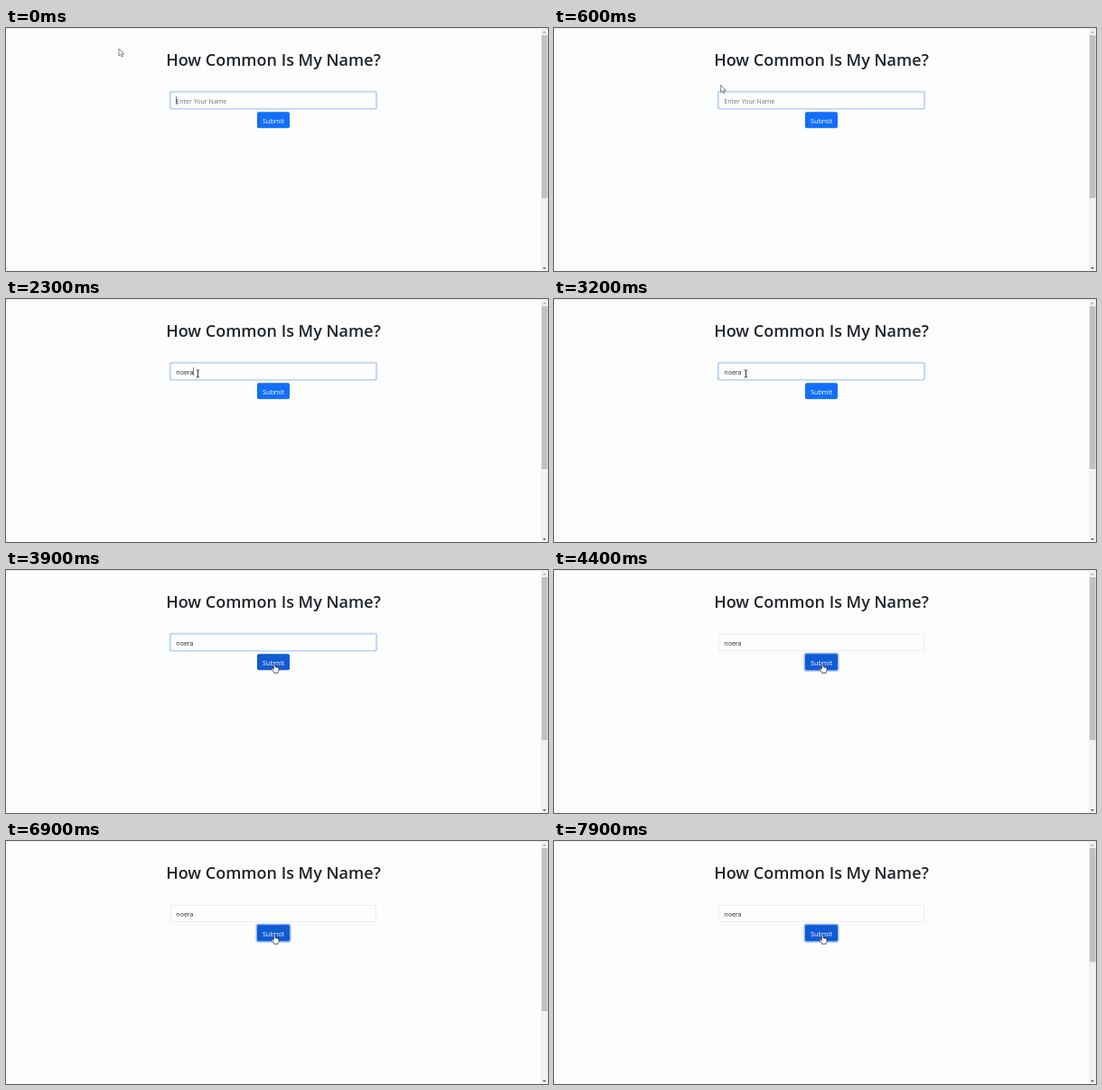
An HTML page with a canvas that plays this animation: 600 px wide and 270 px high, repeating every 8 s.

```html
<!DOCTYPE html>
<html lang="en">
<head>
<meta charset="utf-8">
<title>How Common Is My Name?</title>
<style>
html, body { margin: 0; width: 100%; height: 100%; overflow: hidden; background: #fdfdfd; }
canvas { display: block; width: 600px; height: 270px; }
</style>
</head>
<body>
<canvas id="stage"></canvas>
<script>
const LOOP = 8000;
const FONT = '"Open Sans", "Noto Sans", sans-serif';
const NAME = 'noera';
const KEYS = [1650, 1800, 1950, 2100, 2250];
const CLICK = 4150, HOVER = 3500, GROW = 7600;
// time, x, y of the pointer tip
const PATH = [
  [0, 125, 23], [200, 125, 23], [400, 146, 37], [650, 194, 70], [850, 212, 83],
  [3250, 212, 83], [3400, 252, 92], [3600, 308, 107], [3750, 297.2, 104.2]
];
const canvas = document.getElementById('stage');
const ctx = canvas.getContext('2d');
const dpr = window.devicePixelRatio || 1;
canvas.width = 600 * dpr;
canvas.height = 270 * dpr;

const clamp = v => Math.max(0, Math.min(1, v));
const fade = (t, start) => {
  const p = clamp((t - start) / 150);
  return p * p * (3 - 2 * p);
};
const mix = (a, b, p) => `rgb(${a.map((v, i) => Math.round(v + (b[i] - v) * p))})`;

function rect(x, y, w, h, color) {
  ctx.fillStyle = color;
  ctx.fillRect(x, y, w, h);
}

function round(x, y, w, h, r, color) {
  ctx.fillStyle = color;
  ctx.beginPath();
  ctx.roundRect(x, y, w, h, r);
  ctx.fill();
}

function text(str, x, y, size, color, weight = 400, align = 'left') {
  ctx.font = `${weight} ${size}px ${FONT}`;
  ctx.textAlign = align;
  ctx.fillStyle = color;
  ctx.fillText(str, x, y);
}

function triangle(x, y, dir, color) {
  ctx.fillStyle = color;
  ctx.beginPath();
  ctx.moveTo(x - 2, y);
  ctx.lineTo(x + 2, y);
  ctx.lineTo(x, y + 2 * dir);
  ctx.fill();
}

function scrollbar(t) {
  rect(592, 1, 8, 269, '#f1f1f1');
  rect(593, 8, 6.5, (t < GROW ? 189 : 134.5) - 8, '#c1c1c1');
  triangle(596, 5.5, -1, '#a3a3a3');
  triangle(596, 266, 1, '#505050');
}

function caretOn(t) {
  const last = KEYS.filter(k => k <= t).pop() || 0;
  return t < CLICK && (t - last) % 1060 < 530;
}

function field(t) {
  const focus = 1 - fade(t, CLICK);
  if (focus > 0) {
    ctx.globalAlpha = focus;
    round(180.6, 69.8, 230.6, 21, 2.8, '#c6d9f9');
    ctx.globalAlpha = 1;
  }
  round(182, 71, 228, 18.8, 1.8, mix([222, 226, 230], [165, 193, 240], focus));
  round(182.6, 71.6, 226.8, 17.6, 1.4, '#fefefe');
  const typed = NAME.slice(0, KEYS.filter(k => k <= t).length);
  text(typed || 'Enter Your Name', 188.3, 83.8, 7.05, typed ? '#25292d' : '#6a7178');
  if (caretOn(t)) {
    const x = 188.2 + (typed ? ctx.measureText(typed).width : 0);
    rect(x, 76, 0.7, 9, '#33383d');
  }
}

function button(t) {
  const ring = fade(t, CLICK);
  if (ring > 0) {
    ctx.globalAlpha = ring;
    round(276.5, 91.7, 39, 21, 2.8, '#98bbf5');
    ctx.globalAlpha = 1;
  }
  round(278, 93.2, 36, 18, 1.8, mix([19, 111, 246], [17, 91, 211], fade(t, HOVER)));
  text('Submit', 296, 105.6, 7.25, '#fff', 500, 'center');
}

function pointer(t) {
  const i = PATH.findIndex(p => p[0] > t);
  if (i < 0) return PATH[PATH.length - 1].slice(1);
  const a = PATH[i - 1], b = PATH[i];
  const p = (t - a[0]) / (b[0] - a[0]);
  return [a[1] + (b[1] - a[1]) * p, a[2] + (b[2] - a[2]) * p];
}

const ARROW = new Path2D('M0 0V8L1.9 6.3L3.1 9L4.4 8.4L3.2 5.8H5.7Z');
const HAND = new Path2D('M-.9 .8Q0 -.4 .9 .8V3.8Q1.8 3.1 2.3 4Q3.2 3.5 3.6 4.4' +
  'Q4.7 4 4.8 5.2V7Q4.7 8.4 3.9 9.2V10.2H-.6V9.3L-3.2 6Q-3.4 4.7 -2.3 4.9L-.9 6.1Z');
const BEAM = new Path2D('M-1.7 0H-.5L0 .5L.5 0H1.7M0 .5V7.5M-1.7 8H-.5L0 7.5L.5 8H1.7');

function cursor(t) {
  const [x, y] = pointer(t);
  const inside = (l, top, r, b) => x > l && x < r && y > top && y < b;
  ctx.save();
  ctx.lineJoin = 'round';
  if (inside(182, 71, 410, 90)) {
    ctx.translate(x + 0.4, y - 4);
    ctx.lineWidth = 0.9;
    ctx.strokeStyle = '#111';
    ctx.stroke(BEAM);
  } else {
    const shape = inside(278, 93, 314, 111) ? HAND : ARROW;
    ctx.translate(x, y);
    ctx.fillStyle = '#fff';
    ctx.fill(shape);
    ctx.lineWidth = 0.7;
    ctx.strokeStyle = shape === HAND ? '#222' : '#555';
    ctx.stroke(shape);
  }
  ctx.restore();
}

function draw(t) {
  ctx.setTransform(dpr, 0, 0, dpr, 0, 0);
  rect(0, 0, 600, 270, '#fdfdfd');
  rect(0, 0, 600, 1, '#e9e9e9');
  text('How Common Is My Name?', 296, 42, 18, '#212529', 600, 'center');
  field(t);
  button(t);
  scrollbar(t);
  cursor(t);
}

const start = performance.now();
function tick() {
  draw((performance.now() - start) % LOOP);
  requestAnimationFrame(tick);
}
tick();
</script>
</body>
</html>
```
